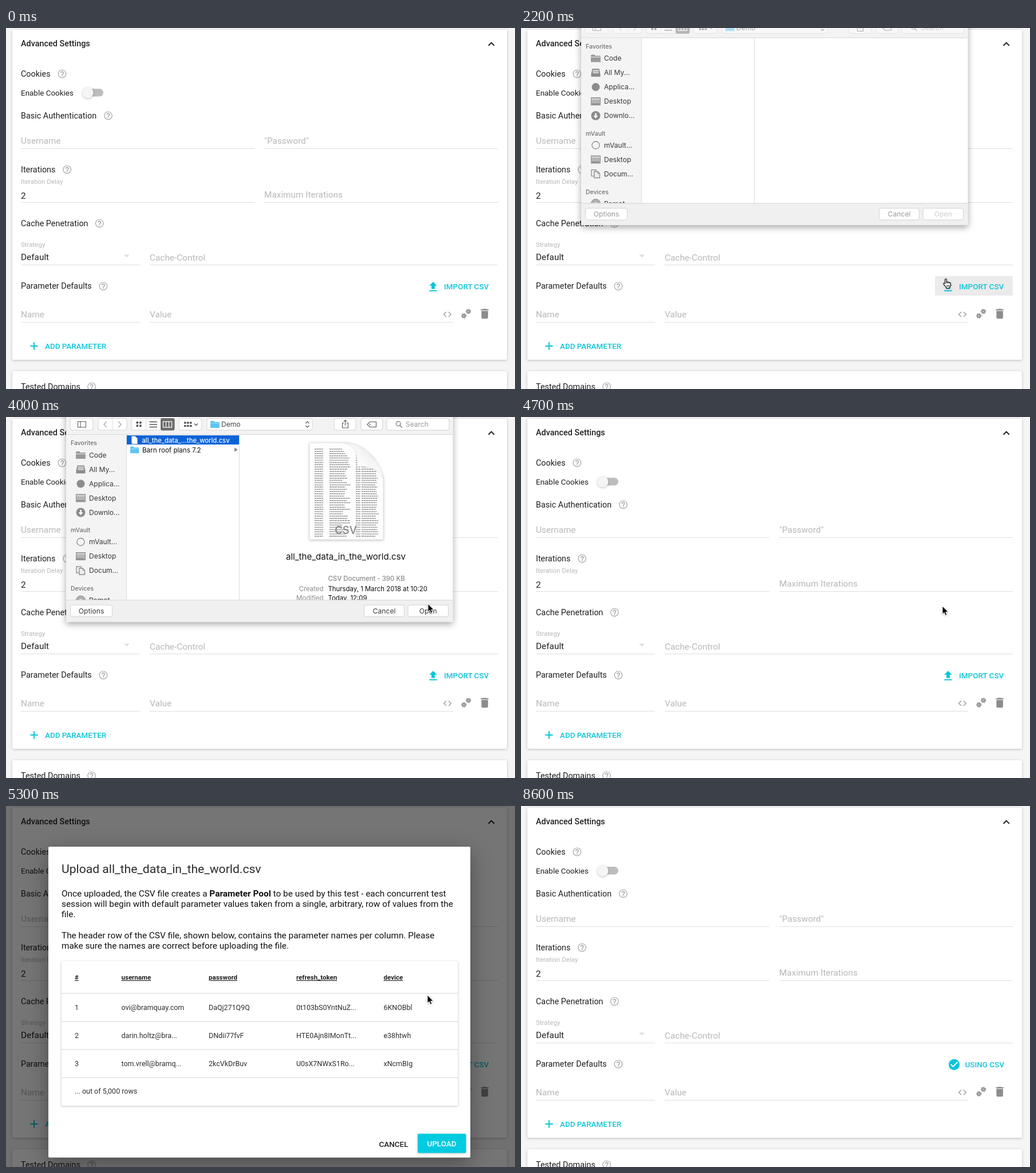
These frames come from a looping animation (889 by 630 pixels, 8.7 s). An HTML page:

```html
<!DOCTYPE html>
<html lang="en">
<head>
<meta charset="utf-8">
<title>CSV import</title>
<style>
html, body { margin: 0; width: 100%; height: 100%; overflow: hidden; background: #f5f5f5; }
svg { display: block; width: 889px; height: 630px; }
text { font-family: Roboto, sans-serif; white-space: pre; }
.mac text { font-family: Inter, sans-serif; }
.card { filter: drop-shadow(0 1px 2px rgba(0,0,0,.24)); }
.lift { filter: drop-shadow(0 10px 18px rgba(0,0,0,.35)); }
.sheet { filter: drop-shadow(0 4px 6px rgba(0,0,0,.35)); }
</style>
</head>
<body>
<svg id="stage" viewBox="0 0 889 630" xmlns="http://www.w3.org/2000/svg"></svg>
<script>
const LOOP = 8700, STEP = 100;
const INK = '#212121', HINT = '#b8b8b8', CYAN = '#0fc5da', GREY = '#8c8c8c';

const text = (x, y, s, size, fill = INK, more = '') =>
  `<text x="${x}" y="${y}" font-size="${size}" fill="${fill}" ${more}>${s}</text>`;
const rect = (x, y, w, h, fill, more = '') =>
  `<rect x="${x}" y="${y}" width="${w}" height="${h}" fill="${fill}" ${more}/>`;
const path = (d, fill, more = '') => `<path d="${d}" fill="${fill}" ${more}/>`;
const line = (d, color, width = 1, more = '') =>
  path(d, 'none', `stroke="${color}" stroke-width="${width}" ${more}`);
const circle = (x, y, r, fill, more = '') =>
  `<circle cx="${x}" cy="${y}" r="${r}" fill="${fill}" ${more}/>`;
const icon = (x, y, scale, fill, d) => path(d, fill, `transform="translate(${x} ${y}) scale(${scale})"`);
const group = (id, body, more = '') => `<g id="${id}" ${more}>${body}</g>`;
const BOLD = 'font-weight="500"', MID = 'text-anchor="middle"', END = 'text-anchor="end"';

/* ---------- settings page ---------- */
const label = (x, y, s) => text(x, y, s, 14.4);
const hint = (x, y, s) => text(x, y, s, 15.36, HINT);
const small = (y, s) => text(26, y, s, 11.52, HINT);
const rule = (x1, x2, y) => line(`M${x1} ${y}H${x2}`, '#dedede');
const help = (x, y) => icon(x - 8.76, y - 8.76, .73, '#a0a0a0',
  'M11 18h2v-2h-2v2zm1-16C6.48 2 2 6.48 2 12s4.48 10 10 10 10-4.48 10-10S17.52 2 12 2zm0 18.4c-4.64 0-8.4-3.76-8.4-8.4s3.76-8.4 8.4-8.4 8.4 3.76 8.4 8.4-3.76 8.4-8.4 8.4zM12 6c-2.21 0-4 1.79-4 4h2c0-1.1.9-2 2-2s2 .9 2 2c0 2-3 1.75-3 5h2c0-2.25 3-2.5 3-5 0-2.21-1.79-4-4-4z');
const gear = (x, y, r) => circle(x, y, r, '#999') +
  circle(x, y, r, 'none', 'stroke="#999" stroke-width="2" stroke-dasharray="1.8 1.6"') +
  circle(x, y, 1.3, '#c4c4c4');

function page() {
  return rect(0, 0, 889, 630, '#f5f5f5') +
    rect(11, 3, 864, 576, '#fff', 'rx="2" class="card"') +
    rect(11, 599, 864, 50, '#fff', 'rx="2" class="card"') +
    text(26, 32, 'Advanced Settings', 14.4, INK, BOLD) +
    line('M842.7 30.8L847.7 25.6L852.7 30.8', '#222', 2) +
    label(26, 84.7, 'Cookies') + help(98, 80) +
    text(26, 118, 'Enable Cookies', 13.44) +
    rect(137, 106, 33, 13.4, '#bdbdbd', 'rx="6.7"') +
    circle(143, 113, 9.5, '#f5f5f5', 'class="card"') +
    label(26, 158, 'Basic Authentication') + help(178.5, 153) +
    hint(26, 202, 'Username') + rule(26, 434, 210.5) +
    hint(451, 202, '"Password"') + rule(451, 859, 210.5) +
    label(26, 252, 'Iterations') + help(106.7, 247) +
    small(272, 'Iteration Delay') + text(26, 298, '2', 15.36) + rule(26, 434, 304.5) +
    hint(451, 296, 'Maximum Iterations') + rule(451, 859, 304.5) +
    label(26, 346, 'Cache Penetration') + help(163.3, 341) +
    small(381.5, 'Strategy') + text(26, 404.5, 'Default', 15.36) + rule(26, 234, 413.5) +
    path('M206.2 395.6h9.6l-4.8 4.8z', '#dedede') +
    hint(251, 405.5, 'Cache-Control') + rule(251, 859, 413.5) +
    label(26, 455.3, 'Parameter Defaults') + help(170, 450.5) +
    rect(723, 433, 136, 34, '#ebebeb', 'rx="2" id="hover"') +
    group('importBtn', icon(734.5, 440.2, .96, CYAN, 'M9 16h6v-6h4l-7-7-7 7h4zm-4 2h14v2H5z') +
      text(765, 456, 'IMPORT CSV', 13.44, CYAN, BOLD)) +
    group('usingBtn', icon(745, 439.8, .96, CYAN,
      'M12 2C6.48 2 2 6.48 2 12s4.48 10 10 10 10-4.48 10-10S17.52 2 12 2zm-2 15l-5-5 1.41-1.41L10 14.17l7.59-7.59L19 8l-9 9z') +
      text(775.6, 456, 'USING CSV', 13.44, CYAN, BOLD)) +
    hint(26, 504.5, 'Name') + rule(26, 234, 513.5) +
    hint(251, 504.5, 'Value') + rule(251, 781, 513.5) +
    line('M769 495.5L764.6 499.7L769 504M773 495.5L777.4 499.7L773 504', '#999', 1.3) +
    gear(799.7, 502.3, 3.7) + gear(807.6, 494.6, 3.7) +
    icon(824.6, 487, .96, GREY, 'M6 19c0 1.1.9 2 2 2h8c1.1 0 2-.9 2-2V7H6v12zM19 4h-3.5l-1-1h-5l-1 1H5v2h14V4z') +
    line('M42.3 555H55.7M49 548.3V561.7', CYAN, 2) +
    text(68, 560, 'ADD PARAMETER', 13.44, CYAN, BOLD) +
    label(26, 631, 'Tested Domains') + help(149.6, 626);
}

/* ---------- file picker ---------- */
const button = (x, w) => rect(x, 2.5, w, 20.5, '#fff', 'rx="3.5" stroke="#d2d2d2"');
const folder = (x, y, s, fill, edge) =>
  icon(x, y, s, fill, 'M0 2Q0 0 2 0H6L8 2H16Q17 2 17 3V13H0Z') +
  line(`M${x} ${y + 4.3 * s}h${17 * s}`, edge);

const glyphs = {
  folder: y => folder(122, y - 6.5, 1, '#9a9a9a', '#eee'),
  tray: y => path(`M124.5 ${y - 7}h12l2 9v5h-16v-5z`, GREY) +
    rect(125.5, y - 5, 10, 6, '#e8e8e8') + line(`M126 ${y - 3}h9M126 ${y - 1}h9`, '#999'),
  dot: y => circle(130.5, y, 7, GREY),
  ring: y => circle(130.5, y, 6.5, '#f5f5f5', `stroke="${GREY}" stroke-width="1.3"`),
  screen: y => rect(122.5, y - 6.5, 16, 13, '#b5b5b5', `stroke="${GREY}"`) +
    line(`M123 ${y - 4}h15`, '#eee') + line(`M124 ${y + 4.5}h13`, '#777', 2, 'stroke-dasharray="2 1"'),
  down: y => circle(130.5, y, 8, GREY) + line(`M130.5 ${y - 4.5}V${y + 1}`, '#fff', 2.4) +
    path(`M126.3 ${y}h8.4l-4.2 4.8z`, '#fff'),
  docs: y => rect(123, y - 7, 8, 11, '#eee', `stroke="${GREY}" stroke-width="1.3"`) +
    path(`M128 ${y - 4}h6l3.5 3.5V${y + 7}h-9.5z`, '#eee', `stroke="${GREY}" stroke-width="1.3"`) +
    line(`M134 ${y - 4}v3.5h3.5`, GREY),
  disc: y => circle(130.5, y, 8, '#b0b0b0', `stroke="${GREY}"`) + circle(130.5, y, 2.4, '#eee')
};

function sidebar() {
  const heads = [[49, 'Favorites'], [201, 'mVault'], [303, 'Devices']];
  const rows = [[66.5, 'folder', 'Code'], [91.5, 'tray', 'All My...'], [116.5, 'dot', 'Applica...'],
    [141.5, 'screen', 'Desktop'], [166.5, 'down', 'Downlo...'], [218, 'ring', 'mVault...'],
    [243, 'screen', 'Desktop'], [268, 'docs', 'Docum...'], [320, 'disc', 'Remot...']];
  return rect(105, 31, 106, 289, '#f4f4f4') + line('M210.5 31V319M407.5 31V319', '#dcdcdc') +
    heads.map(([y, s]) => text(113, y, s, 10.5, '#707070', BOLD)).join('') +
    rows.map(([y, g, s]) => glyphs[g](y) + text(145, y + 4.4, s, 12.1, '#383838')).join('');
}

function toolbar() {
  const dots = [0, 1].map(r => [0, 1].map(c =>
    rect(227.5 + c * 5.5, 8 + r * 5.5, 3.6, 3.6, '#555')).join('')).join('');
  const grid = [0, 1].map(r => [0, 1, 2].map(c =>
    rect(311 + c * 5, 8.5 + r * 5.5, 3.6, 3.2, '#555')).join('')).join('');
  return button(112, 40) + rect(125.5, 8, 14, 10, 'none', 'stroke="#555"') + line('M130 8V18', '#555') +
    button(161, 50) + line('M186 3V23', '#ddd') +
    line('M175.5 8L171 13L175.5 18M196.5 8L201 13L196.5 18', '#aaa', 1.4) +
    button(219, 75) + dots + line('M250.5 8.5H264M250.5 13H264M250.5 17.5H264', '#555', 1.3) +
    line('M244.5 3V23', '#ddd') + rect(270, 2, 24.5, 21.5, '#6c6c6c', 'rx="3"') +
    rect(274.5, 8, 15, 10, 'none', 'stroke="#fff" stroke-width="1.2"') + line('M279.5 8V18M284.5 8V18', '#fff', 1.2) +
    button(302, 40) + grid + line('M329 11.5L332 14.5L335 11.5', '#555', 1.3) +
    button(351, 184) + folder(357, 6.8, .93, '#5cc5f3', '#a5e0fa') + text(376, 17.3, 'Demo', 12.1, '#444') +
    line('M523.5 11L526.5 8L529.5 11M523.5 15L526.5 18L529.5 15', '#555', 1.2) +
    button(573, 38) + line('M590 10.5H587.5V19H597.5V10.5H595M592.5 15V5.5M589.7 8.2L592.5 5.5L595.3 8.2', '#555', 1.1) +
    button(620, 38) + line('M631 13L635.5 8.5H646.5V17.5H635.5Z', '#555', 1.1) + circle(635.8, 13, 1, '#555') +
    button(665, 109) + circle(685.2, 11.7, 4, 'none', 'stroke="#777" stroke-width="1.2"') +
    line('M688.2 14.7L692 18.5', '#777', 1.3) + text(698, 17.3, 'Search', 12, '#999');
}

function preview() {
  let rows = '', seed = 7;
  const rnd = () => (seed = seed * 16807 % 2147483647) / 2147483647;
  for (let y = 56; y < 209; y += 3.9) {
    const d = [[539, 15], [565, 22 + rnd() * 16], [611, 8], [621, 24 + rnd() * 6]]
      .map(([x, w]) => `M${x} ${y}h${w.toFixed(1)}`).join('');
    rows += line(d, '#909090', 1.5, `stroke-dasharray="${(2 + rnd() * 2).toFixed(1)} .7"`);
  }
  return path('M530 45H596Q642 52 659 106V214H530Z', '#fdfdfd', 'class="card" stroke="#e4e4e4"') +
    `<clipPath id="sheetClip"><path d="M530 45H602Q616 56 613 86Q644 84 659 106V214H530Z"/></clipPath>` +
    `<g clip-path="url(#sheetClip)">${rows}</g>` +
    path('M588 45Q617 50 613 87Q646 83 659 108Q658 91 646 76L616 50Q605 45 588 45Z', 'url(#curl)', 'stroke="#ddd" stroke-width=".7"') +
    text(593.5, 204, 'CSV', 18.4, '#858585', MID + ' ' + BOLD) +
    text(593.5, 249, 'all_the_data_in_the_world.csv', 15.1, '#111', MID) +
    text(562.5, 286, 'CSV Document - 390 KB', 11.4, '#8a8a8a', BOLD) +
    text(554.5, 303.5, 'Created', 11.4, '#8a8a8a', END) +
    text(562.5, 303.5, 'Thursday, 1 March 2018 at 10:20', 11.4, '#111') +
    text(554.5, 319.5, 'Modified', 11.4, '#8a8a8a', END) +
    text(562.5, 319.5, 'Today, 12:09', 11.4, '#111');
}

function picker() {
  const push = (x, w, s, id) => rect(x, 328, w, 20.5, '#fff', 'rx="3.5" stroke="#d2d2d2"') +
    text(x + w / 2, 342.7, s, 12.2, '#3a3a3a', `${MID} id="${id}"`);
  return rect(105, -30, 675.5, 387.5, '#fff', 'class="sheet"') +
    rect(105, -30, 675.5, 60.5, '#f3f3f3') + line('M105 30.5H780', '#d6d6d6') +
    group('tools', toolbar()) + sidebar() +
    group('files', rect(211, 32, 196, 16, '#0a63d8', 'id="pick"') +
      path('M219.5 33.5h6l4 4v9.5h-10z', '#fff', 'stroke="#bbb" stroke-width=".6"') +
      text(237.5, 44.5, 'all_the_data_...the_world.csv', 11.2, '#111', BOLD + ' id="file"') +
      folder(217, 51.5, .9, '#5cc5f3', '#a5e0fa') +
      text(238, 61.5, 'Barn roof plans 7.2', 11.6, '#111') + path('M399 53.5l6 3.5l-6 3.5z', '#888')) +
    group('preview', preview()) +
    rect(105, 319, 675.5, 38.5, '#f0f0f0') + line('M105 319.5H780', '#d6d6d6') +
    push(112.5, 73, 'Options', 'options') + push(625.5, 70, 'Cancel', 'cancel') + push(702, 70.5, 'Open', 'open');
}

/* ---------- upload dialog ---------- */
function modal() {
  const cols = [120, 201.5, 354, 507, 659.5];
  const heads = ['#', 'username', 'password', 'refresh_token', 'device'];
  const rows = [
    ['1', 'ovi@bramquay.com', 'DaQj271Q9Q', '0t103bS0YntNuZ...', '6KNOBbl'],
    ['2', 'darin.holtz@bra...', 'DNdii77fvF', 'HTE0Ajn8IMonTt...', 'e38htwh'],
    ['3', 'tom.vrell@bramq...', '2kcVkDrBuv', 'U0sX7NWxS1Ro...', 'xNcmBIg']];
  const copy = [
    [158, 'Once uploaded, the CSV file creates a <tspan font-weight="700">Parameter Pool</tspan> to be used by this test - each concurrent test'],
    [176, 'session will begin with default parameter values taken from a single, arbitrary, row of values from the'],
    [194.2, 'file.'],
    [231, 'The header row of the CSV file, shown below, contains the parameter names per column. Please'],
    [249, 'make sure the names are correct before uploading the file.']];
  return rect(74, 71, 737, 542.5, '#fff', 'rx="2" class="lift"') +
    text(97, 116.5, 'Upload all_the_data_in_the_world.csv', 21.12, '#2a2a2a') +
    copy.map(([y, s]) => text(97, y, s, 15.36, '#111')).join('') +
    rect(97, 271, 692, 252, '#fff', 'rx="2" class="card"') +
    line([327, 376, 425, 474].map(y => `M97 ${y}H789`).join(''), '#e2e2e2', 1.6) +
    heads.map((s, i) => text(cols[i], 303, s, 11.52, '#222', 'font-weight="700" text-decoration="underline"')).join('') +
    rows.map((r, j) => r.map((s, i) => text(cols[i], 355.5 + j * 49, s, 12.48, '#2e2e2e')).join('')).join('') +
    text(120, 502.3, '... out of 5,000 rows', 12.48, '#2e2e2e') +
    text(651.5, 594.8, 'CANCEL', 13.44, INK, BOLD) +
    rect(719, 572, 84.5, 33.5, '#00cbe1', 'rx="2" class="card"') +
    rect(719, 572, 84.5, 33.5, '#fff', 'rx="2" id="glow"') +
    text(761, 594, 'UPLOAD', 13.44, '#fff', MID + ' ' + BOLD);
}

const arrow = path('M0 0V14.2L3.2 11.3L5.4 16.4L7.9 15.3L5.7 10.4H10.2Z', '#000', 'stroke="#fff" stroke-width="1" class="card"');
const hand = `<g transform="translate(-4.8 -1)">` +
  path('M3.5 9V2Q3.5 .7 4.8 .7T6.1 2V6.5Q7.5 5.6 8.6 6.8Q10 6 11 7.3Q12.9 6.9 13 9V12Q12.6 14 11.6 15V17H5.5V15.4Q3 13 .8 9.8Q.4 8.4 1.6 8.3Q2.6 8.4 3.5 9Z',
    '#fff', 'stroke="#000" stroke-width="1.1" class="card"') +
  line('M6.1 6.5V9M8.6 7V9M11 7.5V9.2M6.8 11.5V14.5M8.7 11.5V14.5M10.5 11.5V14.5', '#000', .8) + '</g>';

document.getElementById('stage').innerHTML =
  '<defs><linearGradient id="curl" x1="0" y1="1" x2=".8" y2=".2"><stop offset="0" stop-color="#d5d5d5"/>' +
  '<stop offset=".45" stop-color="#fff"/><stop offset="1" stop-color="#ececec"/></linearGradient></defs>' +
  page() + group('picker', picker(), 'class="mac"') +
  rect(0, 0, 889, 630, '#000', 'id="shade"') + group('modal', modal()) +
  group('cursor', group('arrow', arrow) + group('hand', hand));

/* ---------- motion ---------- */
const el = {};
document.querySelectorAll('[id]').forEach(n => el[n.id] = n);
const set = (id, name, value) => el[id].setAttribute(name, value);
const show = (id, on) => set(id, 'display', on ? 'inline' : 'none');
const clamp = v => Math.max(0, Math.min(1, v));
const within = (t, a, b) => t >= a && t < b;
const smooth = p => p * p * (3 - 2 * p);

const route = [[400, 690, 624], [1200, 725, 520], [1600, 738, 478], [1900, 738, 478], [2000, 742, 438],
  [2400, 742, 438], [3000, 290, 40], [3300, 290, 40], [3900, 737, 326], [4200, 737, 326], [4500, 736, 330],
  [5700, 736, 330], [6200, 752, 606], [6500, 750.5, 598], [7100, 750.5, 595]];
const drops = [[2000, -400], [2100, -150], [2200, -13.5], [2300, 0], [4300, 0], [4400, -110], [4500, -290], [4600, -400]];

// Eased values between the rows of a [time, ...values] list.
function track(keys, t, ease) {
  let i = keys.findIndex(k => k[0] > t);
  if (i < 0) return keys[keys.length - 1].slice(1);
  if (!i) return keys[0].slice(1);
  const a = keys[i - 1], b = keys[i], p = ease((t - a[0]) / (b[0] - a[0]));
  return a.slice(1).map((v, k) => v + (b[k + 1] - v) * p);
}

function draw(t) {
  show('importBtn', t < 7800);
  show('usingBtn', t >= 7800);
  set('hover', 'opacity', within(t, 2000, 2500) ? clamp((t - 1900) / 200) : 0);

  const active = t >= 2300, picked = t >= 3200;
  show('picker', within(t, 2100, 4600));
  set('picker', 'transform', `translate(0 ${track(drops, t, p => p)[0]})`);
  set('tools', 'opacity', active ? 1 : .45);
  show('files', active);
  show('pick', picked);
  set('file', 'fill', picked ? '#fff' : '#111');
  show('preview', picked);
  for (const id of ['options', 'cancel']) set(id, 'fill', active ? '#3a3a3a' : '#999');
  set('open', 'fill', picked ? '#3a3a3a' : '#ccc');

  const open = within(t, 4900, 7800), p = 1 - (1 - clamp((t - 4850) / 450)) ** 4;
  show('shade', open);
  show('modal', open);
  set('shade', 'opacity', .54 * p);
  set('modal', 'opacity', p);
  set('modal', 'transform', `translate(0 ${-64 * (1 - p)})`);
  set('glow', 'opacity', .46 * clamp((t - 6000) / 300));

  const [x, y] = track(route, t, smooth);
  const point = within(t, 2000, 2500) || within(t, 6200, 7800);
  show('cursor', within(t, 400, 8000));
  set('cursor', 'transform', `translate(${x} ${y})`);
  show('arrow', !point);
  show('hand', point);
}

const start = performance.now();
function tick() {
  const t = (performance.now() - start) % LOOP;
  draw(Math.floor(t / STEP) * STEP);
  requestAnimationFrame(tick);
}
tick();
</script>
</body>
</html>
```
